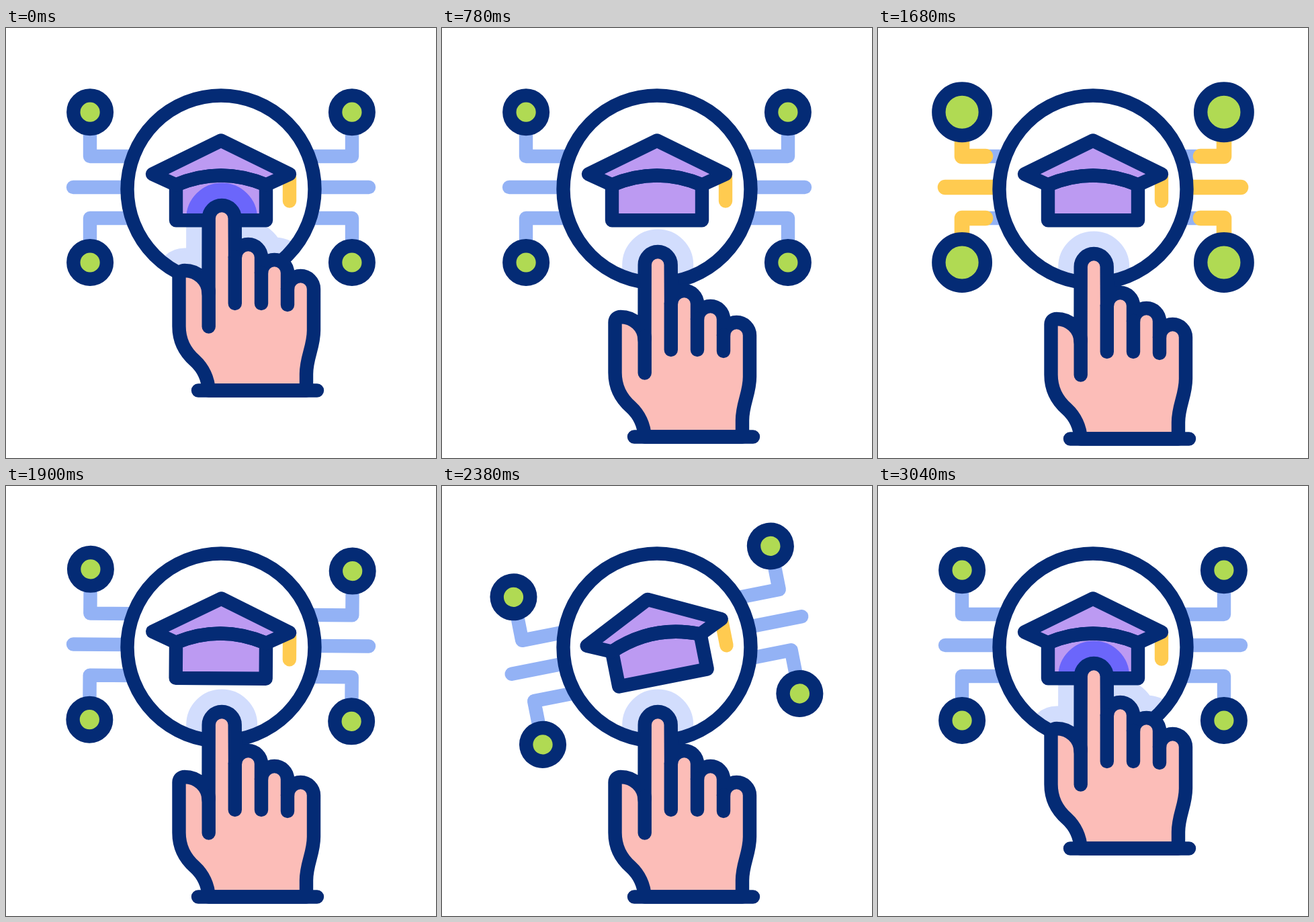
These frames come from a looping animation (640x640 px, 3200 ms). An HTML page with a canvas:

```html
<!DOCTYPE html>
<html lang="en">
<head>
<meta charset="utf-8">
<title>Online learning</title>
<style>
  html, body { margin: 0; width: 100%; height: 100%; overflow: hidden; background: #fff; }
  canvas { display: block; width: 100%; height: 100%; }
</style>
</head>
<body>
<canvas id="stage" width="640" height="640"></canvas>
<script>
const ctx = document.getElementById('stage').getContext('2d');
const LOOP = 3200, CX = 320, CY = 240, WIDTH = 20.4;
const NAVY = '#042b75', SKY = '#93b2f5', GOLD = '#ffcb50', LIME = '#b0da53',
      PINK = '#fcbdb8', LILAC = '#bc9af2', VIOLET = '#6b66fb', HALO = '#d2ddfd';

// Outlines use absolute "x,y" pairs so that every point can be remapped.
const fingertip = (x, y) =>
  `L${x},${y} C${x},${y - 10.8} ${x + 8.8},${y - 19.5} ${x + 19.5},${y - 19.5} ` +
  `C${x + 30.2},${y - 19.5} ${x + 39},${y - 10.8} ${x + 39},${y} `;
const PALM = 'M301.5,539.5 C301,522 293,506 281,495 C265,481 257.5,463 257.5,444 ' +
  'L257.5,369 C257.5,364 261,361 266,361 C285,361 301.5,376 301.5,395 ' +
  fingertip(301.7, 283.5) + fingertip(341, 341.5) + fingertip(380, 364.5) + fingertip(419, 388.5) +
  'L458,450 C458,475 447,490 447,515 L447,539.5 Z';
const CREASES = 'M301.7,390 L301.7,444.5 M340.8,341 L340.8,410 M380,364 L380,410 ' +
  'M419,388 L419,412 M286,539.5 L463,539.5';
const BOARD = 'M320,167.5 L422,217.5 L387,233.5 Q320,205.5 253,233.5 L218,217.5 Z';
const BODY = 'M253,233.5 L253,286.3 L387,286.3 L387,233.5 Q320,205.5 253,233.5 Z';
const TASSEL = 'M422,222 L422,257.5';

const WIRES = [
  { d: 'M225,191 L125,191 L125,125', len: 166 },
  { d: 'M225,237 L100,237', len: 125 },
  { d: 'M225,283 L125,283 L125,349', len: 166 }
];
const SPARKS = [[272, 216, 251, 201], [303, 207, 295, 176], [334, 200, 350, 174]];

const remap = (d, fn) => new Path2D(
  d.replace(/(-?[\d.]+),(-?[\d.]+)/g, (_, x, y) => fn(+x, +y).join(',')));

// Eased value through [time, value] keys.
function keys(t, ...list) {
  if (t <= list[0][0]) return list[0][1];
  for (let i = 1; i < list.length; i++) {
    const [t0, v0] = list[i - 1], [t1, v1] = list[i];
    if (t < t1) {
      const p = (t - t0) / (t1 - t0);
      return v0 + (v1 - v0) * p * p * (3 - 2 * p);
    }
  }
  return list[list.length - 1][1];
}

function stroke(path, color, width = WIDTH) {
  ctx.strokeStyle = color;
  ctx.lineWidth = width;
  ctx.stroke(path);
}

function fill(path, color) {
  ctx.fillStyle = color;
  ctx.fill(path);
}

function disc(x, y, r) {
  const p = new Path2D();
  p.arc(x, y, r, 0, Math.PI * 2);
  return p;
}

function clipped(paths, draw) {
  const area = new Path2D();
  paths.forEach(p => area.addPath(p));
  ctx.save();
  ctx.clip(area);
  draw();
  ctx.restore();
}

function network(t, turn) {
  const head = keys(t, [1000, 0], [1360, 1]);
  const tail = keys(t, [1540, 0], [1870, 1]);
  const radius = keys(t, [1000, 24.8], [1470, 45.6], [1880, 24.8]);
  for (const side of [1, -1]) {
    ctx.save();
    ctx.translate(CX, CY);
    ctx.rotate(turn);
    ctx.scale(side, 1);
    ctx.translate(-CX, -CY);
    for (const { d, len } of WIRES) {
      const wire = new Path2D(d);
      stroke(wire, SKY);
      if (head > tail) {
        ctx.setLineDash([len * (head - tail), 999]);
        ctx.lineDashOffset = -len * tail;
        stroke(wire, GOLD, 22.6);
        ctx.setLineDash([]);
      }
    }
    for (const y of [125.2, 349]) {
      const node = disc(125.1, y, radius);
      fill(node, LIME);
      stroke(node, NAVY);
    }
    ctx.restore();
  }
}

function sparks(t) {
  const head = keys(t, [200, 0], [330, 1]);
  const tail = keys(t, [350, 0], [520, 1]);
  if (head <= tail) return;
  for (const [x0, y0, x1, y1] of SPARKS) {
    const at = p => `${x0 + (x1 - x0) * p},${y0 + (y1 - y0) * p}`;
    stroke(new Path2D(`M${at(tail)} L${at(head)}`), GOLD, 21);
  }
}

function draw(t) {
  const press = keys(t, [0, 0], [310, 1.05], [550, 0]);
  const drop = keys(t, [540, 0], [815, 72], [2725, 72], [3020, 0]);
  const turn = keys(t, [1880, 0], [2075, 12.3], [2350, -12.3], [2595, 12.3], [2800, 0]) * Math.PI / 180;

  const size = 1 - 0.211 * press, cos = Math.cos(turn) * size, sin = Math.sin(turn) * size;
  const spin = (x, y) => [
    CX + (x - CX) * cos - (y - CY) * sin,
    CY + (x - CX) * sin + (y - CY) * cos
  ];
  // The hand tilts in perspective around the index fingertip.
  const tilt = (x, y) => {
    const u = x - 321, v = y - 264, w = 1 - 0.000963 * press * v;
    return [
      321 - 4.5 * press + ((1 - 0.2755 * press) * u + 0.1653 * press * v) / w,
      264 - 20 * press + (-0.137 * press * u + (1 - 0.288 * press) * v) / w + drop
    ];
  };

  const palm = remap(PALM, tilt), creases = remap(CREASES, tilt);
  const board = remap(BOARD, spin), body = remap(BODY, spin);
  const ring = disc(CX, CY, 139.5 * size);
  const glow = color => {
    fill(palm, color);
    stroke(palm, color, 67);
  };

  ctx.fillStyle = '#fff';
  ctx.fillRect(0, 0, 640, 640);
  ctx.lineCap = ctx.lineJoin = 'round';

  network(t, turn);
  fill(ring, '#fff');
  clipped([ring], () => glow(HALO));
  stroke(remap(TASSEL, spin), GOLD);
  for (const part of [body, board]) {
    fill(part, LILAC);
    clipped([part], () => glow(VIOLET));
  }
  stroke(body, NAVY);
  stroke(board, NAVY);
  stroke(ring, NAVY);
  fill(palm, PINK);
  stroke(palm, NAVY);
  stroke(creases, NAVY);
  sparks(t);
}

const start = performance.now();
function frame() {
  draw((performance.now() - start) % LOOP);
  requestAnimationFrame(frame);
}
frame();
</script>
</body>
</html>
```
